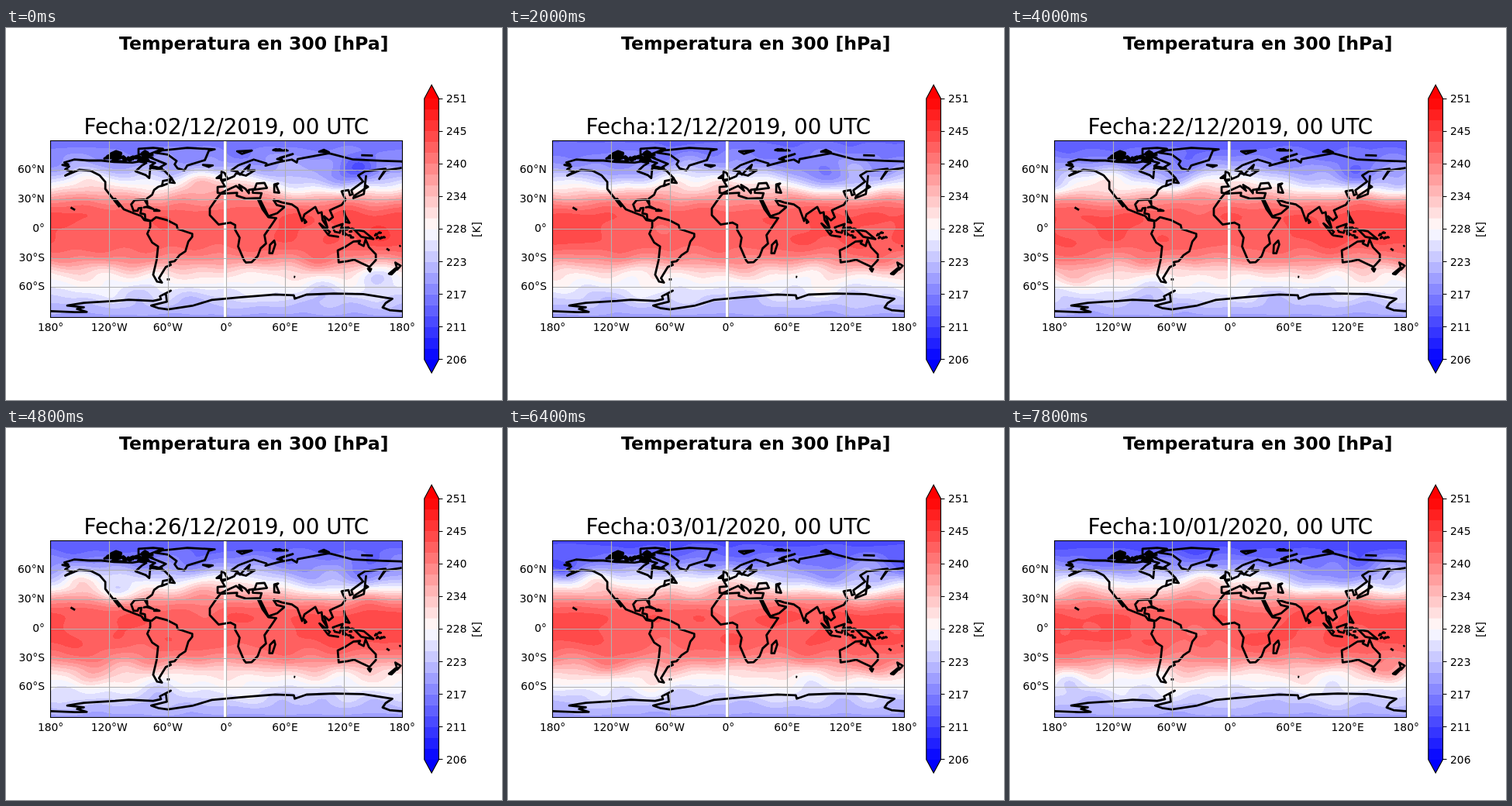
An HTML page with a canvas for the animation above (8000 ms loop, 640 by 480 pixels).

```html
<!DOCTYPE html>
<html lang="es">
<head>
<meta charset="utf-8">
<title>Temperatura en 300 hPa</title>
<style>
  html, body { margin: 0; width: 100%; height: 100%; overflow: hidden; background: #fff; }
  canvas { position: absolute; left: 57px; top: 145px; }
  svg { position: absolute; left: 0; top: 0; font: 13.89px "DejaVu Sans", sans-serif; }
</style>
</head>
<body>
<canvas id="field" width="455" height="228"></canvas>
<svg id="plot" width="640" height="480" viewBox="0 0 640 480">
  <clipPath id="frame"><rect x="57" y="145" width="455" height="229"/></clipPath>
  <text x="319.7" y="28" font-size="23.61" font-weight="bold" text-anchor="middle">Temperatura en 300 [hPa]</text>
  <text id="date" x="284.4" y="137" font-size="27.78" text-anchor="middle"></text>
  <g clip-path="url(#frame)">
    <path id="coast" transform="translate(284.4 259.2) scale(1.26 -1.26)" fill="none" stroke="#000" stroke-width="2.2" stroke-linejoin="round"/>
  </g>
  <path id="grid" stroke="#b0b0b0" stroke-width="1.1"/>
  <rect x="57.5" y="145.5" width="454" height="228" fill="none" stroke="#000" stroke-width="1.1"/>
  <g id="labels"></g>
  <g id="bar"></g>
  <text transform="translate(612 260) rotate(-90)" text-anchor="middle">[K]</text>
</svg>
<script>
const SCALE = 1.26, CX = 284.4, CY = 259.2;
const LOW = 205.8, STEP = 1.877, BANDS = 24;
const DAYS = 40, HOLD = 200, RAD = Math.PI / 180;
const $ = id => document.getElementById(id);

let seed = 11;
const rand = () => (seed = seed * 16807 % 2147483647) / 2147483647;
const between = (a, b) => a + (b - a) * rand();

// Main coast points in degrees of longitude and latitude.
const coast = {
  americaWest: 'M-141,70 -156,71 -166,68 -162,66 -168,65.5 -161,64 -165,61 -158,58.5 -165,54.5 -151,60.5 -139,59.5 -130,55 -124,48 -124,41 -117,32 -110,23 -114,31 -105,20 -95,16 -87,13 -84,9 -78,8',
  americaEast: 'M-77,8 -83,10 -83.5,15 -88,16 -87,21.5 -90,21 -91,18.5 -95,18.5 -97.5,25 -94,29.5 -84,30 -81,25 -81.5,31 -76,35 -74,40 -70,43 -61,46 -66,44 -65,49 -60,50 -56,52 -64,60 -73,62 -78,62.5 -79,52 -82.5,55 -93,59 -87,64.5 -82,67.5 -90,69 -96,68 -115,68.5 -128,70 -141,70',
  northIslands: 'M-62,66.5 -68,63 -66,62 -78,64.5 -73,67.5 -90,72 -80,73.7Z M-90,76.5 -80,76.2 -65,82 -75,83 -90,82Z M-117,70 -103,69 -106,73Z M-125,72 -116,73 -122,74Z M-59,47.7 -53,47 -56,51.5Z',
  greenland: 'M-73,78 -60,76 -51,69.5 -53,66 -50,62 -43,60 -40,65 -22,70.5 -18,80 -12,81.5 -40,83 -65,80.5Z M-24,65.5 -18,63.4 -14,65Z',
  southAmerica: 'M-78,8 -78,2 -81,-5 -76,-14 -70,-18 -71.5,-32 -75,-47 -71,-54 -66,-55 -69,-50.5 -62,-39 -57,-37 -58,-34 -53,-33 -48,-27 -42,-23 -39,-13 -35,-8 -35,-5 -50,0 -51,4 -61,9 -72,12 -77,8',
  caribbean: 'M-84.5,22 -80,23 -74.5,20.2 -82,22.5Z M-74,18.5 -72,19.8 -68.5,18.5Z',
  africa: 'M-6,36 -10,31 -17,21 -17,14 -8,4.5 4,6.5 9,4 9,-1 13.5,-9 12,-18 18,-32 20,-34.5 26,-34 32,-28 35,-20 40.5,-15 39,-6.5 51,11 43,12 37,20 32.5,29.8 35,29 43,13 52,16 59.5,22.5 51.5,24.5 48,30',
  madagascar: 'M44,-25 44.5,-16.5 49,-12 50,-16 47,-25Z',
  asiaSouth: 'M48,30 57,27 67,25 72.7,21 77.5,8 80,15 91,22.5 94,16 97.5,17 98.5,9 103.5,1.3 100,13 105,8.7 109,12 106,19 110,21 118,24.5 122,30 119.5,35 118,38.5 125,39.7 126.5,34.5 129.3,35.5 128,39.5 140,48.5 135,54.7 142,59 163,61.5 156.5,51.2 163,60 179.5,62.5',
  asiaNorth: 'M180,69 160,69.7 130,71 105,77.5 73,71.5 72,68 67,71 54,68.5 40,64.7 41,67 28,71 12,65 5,60 11,59 14,55.5 18,60 24,65.7 22,60 29,60 20,54.5 10,57 8,54 -4.5,48.5 -1.5,43.5 -9,43 -9,37 -6,36.5',
  mediterranean: 'M-6,36.5 0,39.5 10,44 16,39 13,45 19.5,41 23,36.5 23,40 29,41 31,46.5 39,47 41.5,42 27,40 27,37 36,36.5 34.5,31.5 20,31 10.5,34 11,37 -6,36',
  caspian: 'M49,45.5 49,37.5 54,37 51,44.5 53,46.5Z',
  britain: 'M-5.5,50 1.3,51 -2,57.5 -5,58.5Z M-10,52 -6,52.2 -6,55Z',
  arcticRussia: 'M11,79.5 16,76.8 26,80.2Z M52,71.5 57,70.7 55,73 68,76.7Z M95,79 105,78.5 100,81Z M138,75.5 150,75',
  indonesia: 'M95.3,5.6 104,-5.8 106,-3Z M105.3,-6.7 114.5,-8Z M109,1.5 111,-3 116,-4 119,5Z M119.5,-5.5 120,1 125,1.5 121,-1Z M131,-.8 141,-2.6 150.5,-10.5 138,-8Z',
  eastIslands: 'M80,9.5 81.8,7 80.3,6Z M120.5,18.3 121.5,14 126,6.2 122,7Z M130,31.5 131,34 140,40 145,43 142,45 140.7,35.7Z M142,46 143,54Z',
  australia: 'M114,-22 115,-34.2 124,-33 131,-31.5 138,-35 146.5,-39 153,-32 153,-26 146,-18.8 142.5,-10.8 140.5,-17.5 135.5,-15 136.8,-12.2 130,-13 122.3,-18Z M145,-40.8 148.2,-41 147,-43.6Z',
  newZealand: 'M173,-34.5 178.4,-37.7 175,-41.6Z M173,-40.5 174,-41.7 169,-46.6 166.5,-46Z',
  smallIslands: 'M-159.5,22 -155,19.3 M69,-49 70.5,-49.3 M-61,-51.7 -58,-51.7 M164,-20.2 167,-22.2 M177,-18 178.6,-17',
  antarctica: 'M-180,-84.3 -155,-85.2 -143,-85 -153,-82 -146,-80.3 -163,-78.5 -146,-75.8 -114,-73.8 -100,-72.5 -75,-73.8 -67,-72 -68,-69 -57,-63.3 -62,-66 -61,-74.5 -77,-78.5 -70,-81 -60,-82.5 -35,-78.8 -15,-72.8 15,-70 50,-67.2 69,-68 70,-71.5 82,-67.3 110,-66.3 140,-66.8 170,-71.5 163,-76 160,-80.5 167,-83.2 180,-84.3'
};

// A loose scatter of small islands inside a box of degrees.
function islands(count, west, east, south, north, size) {
  return Array.from({ length: count }, () => {
    const x = between(west, east), y = between(south, north), w = size * between(0.5, 1.5);
    return `M${x},${y}l${w},${between(-1, 1)} ${-w / 2},${size / 4}Z`;
  }).join('');
}

// Mean temperature every 15 degrees, from south to north.
const zonal = [220.5, 223.5, 227, 231.5, 239, 242.8, 243, 243, 237.5, 228, 220.5, 216.5, 214];

// Passing warm and cold systems: day, lon, lat, kelvin.
const systems = [
  [0, -145, 52, 6], [0, -25, 50, 4], [0, 140, 62, -4], [0, 155, -48, -5],
  [6, -105, 48, -5], [6, 165, 48, 4], [6, -110, -42, -5], [6, 0, -42, 4],
  [14, -105, 50, -6], [14, -35, 52, 5], [14, -50, -40, -4], [14, 100, -52, -4],
  [20, 180, 42, -5], [20, -125, 52, 5], [20, -50, 48, -6], [20, -165, -52, 4],
  [24, -150, 50, 5], [24, -115, 38, -7], [24, -140, -48, 4],
  [32, -135, 50, 5], [32, -170, 62, -4], [32, -130, -42, 6], [32, 150, -40, 5],
  [39, -150, 48, 4], [39, -25, 48, 3], [39, -165, -52, -4], [39, 160, -45, 5]
];

const waves = Array.from({ length: 10 }, (_, i) => ({
  k: 2 + i % 7,
  l: (i % 2 ? 1 : -1) * between(0.06, 0.19),
  phase: between(0, 2 * Math.PI),
  speed: between(0.15, 0.45)
}));
const noise = (lon, lat, day) => waves.reduce((sum, w) =>
  sum + Math.sin(w.k * lon * RAD + w.l * lat + w.phase - w.speed * day), 0) * 0.3;

const bell = x => Math.exp(-x * x);
const clamp = (v, lo, hi) => Math.min(hi, Math.max(lo, v));

// Smooth curve through evenly spaced values.
function curve(vals, u) {
  const i = Math.floor(u), f = u - i;
  const [a, b, c, d] = [-1, 0, 1, 2].map(k => vals[clamp(i + k, 0, vals.length - 1)]);
  return b + f / 2 * (c - a + f * (2 * a - 5 * b + 4 * c - d + f * (3 * (b - c) + d - a)));
}

const COLS = 145, ROWS = 73, GRID = 2.5;
const temp = new Float32Array(COLS * ROWS);

function solve(day) {
  const active = systems.map(([d, lon, lat, k]) => ({
    lon: lon + 4 * (day - d), lat, k: k * bell((day - d) / 3.5)
  })).filter(p => Math.abs(p.k) > 0.05);
  for (let r = 0; r < ROWS; r++) {
    const lat = 90 - r * GRID, far = Math.abs(lat);
    const mean = curve(zonal, (lat + 90) / 15) + (2 - day / 10) * clamp((lat - 55) / 25, 0, 1);
    const gain = Math.min(0.8 + 0.7 * clamp((far - 20) / 20, 0, 1), (90 - far) / 12);
    const north = bell((lat - 48) / 14), tropics = bell(lat / 25);
    for (let c = 0; c < COLS; c++) {
      const lon = c * GRID - 180, a = lon * RAD;
      // Cold Asia, mild Atlantic, warm western Pacific.
      let t = mean + north * (3.5 * Math.cos(a + 0.7) + 2 * Math.cos(2 * a + 5.76));
      t += tropics * 0.9 * Math.cos(a - 2.6) + gain * noise(lon, lat, day);
      for (const p of active) {
        const dx = (lon - p.lon + 900) % 360 - 180;
        t += p.k * bell(dx / 19) * bell((lat - p.lat) / 11);
      }
      temp[r * COLS + c] = t;
    }
  }
}

const colors = Array.from({ length: BANDS }, (_, i) => {
  const t = (i + 0.5) / BANDS, up = Math.round(510 * t), down = Math.round(510 * (1 - t));
  return t < 0.5 ? [up, up, 255] : [255, down, down];
});
const ctx = $('field').getContext('2d');
const img = ctx.createImageData(455, 228);

function paint() {
  for (let y = 0, p = 0; y < img.height; y++) {
    const v = clamp((90 - (CY - 145.5 - y) / SCALE) / GRID, 0, ROWS - 1.001);
    const r = Math.floor(v), fy = v - r;
    for (let x = 0; x < img.width; x++, p += 4) {
      const lon = (x + 57.5 - CX) / SCALE;
      const u = clamp((lon + 180) / GRID, 0, COLS - 1.001);
      const c = Math.floor(u), fx = u - c, o = r * COLS + c;
      const top = temp[o] + (temp[o + 1] - temp[o]) * fx;
      const low = temp[o + COLS] + (temp[o + COLS + 1] - temp[o + COLS]) * fx;
      const band = Math.floor((top + (low - top) * fy - LOW) / STEP);
      // The data stop one cell short of the prime meridian.
      const rgb = lon > -GRID && lon < 0 ? [255, 255, 255] : colors[clamp(band, 0, BANDS - 1)];
      img.data[p] = rgb[0];
      img.data[p + 1] = rgb[1];
      img.data[p + 2] = rgb[2];
      img.data[p + 3] = 255;
    }
  }
  ctx.putImageData(img, 0, 0);
}

const label = (x, y, text, anchor) => `<text x="${x}" y="${y}" text-anchor="${anchor}">${text}</text>`;

function buildMap() {
  $('coast').setAttribute('d', Object.values(coast).join(' ') +
    islands(24, -122, -84, 69, 77.5, 7) + islands(5, 46, 62, 80, 81, 4) +
    islands(8, 118, 130, -9, 2, 2) + islands(5, 150, 162, -10, -4, 2));
  let lines = '', marks = '';
  for (let lon = -180; lon <= 180; lon += 60) {
    const x = CX + lon * SCALE, side = lon % 180 ? (lon < 0 ? 'W' : 'E') : '';
    if (Math.abs(lon) < 180) lines += `M${Math.round(x) + 0.5},146V373`;
    marks += label(x, 391, Math.abs(lon) + '°' + side, 'middle');
  }
  for (let lat = -60; lat <= 60; lat += 30) {
    const y = CY - lat * SCALE, side = lat ? (lat < 0 ? 'S' : 'N') : '';
    lines += `M58,${Math.floor(y) + 0.5}H511`;
    marks += label(50, y + 3.65, Math.abs(lat) + '°' + side, 'end');
  }
  $('grid').setAttribute('d', lines);
  $('labels').innerHTML = marks;
}

function buildBar() {
  const x0 = 539.8, x1 = 558.5, top = 91, bottom = 427.8, h = (bottom - top) / BANDS;
  const mid = (x0 + x1) / 2, upper = `L${mid},73.5 ${x1},${top}`, lower = `L${mid},445 ${x0},${bottom}`;
  let out = `<path d="M${x0},${top}${upper}Z" fill="#f00"/><path d="M${x1},${bottom}${lower}Z" fill="#00f"/>`;
  colors.forEach((c, i) => {
    out += `<rect x="${x0}" y="${bottom - (i + 1) * h}" width="${x1 - x0}" height="${h + 0.3}" fill="rgb(${c})"/>`;
  });
  out += `<path d="M${x0},${top}${upper}V${bottom}${lower}Z" fill="none" stroke="#000" stroke-width="1.1"/>`;
  for (let i = 0; i <= BANDS; i += 3) {
    const y = bottom - i * h;
    out += `<path d="M${x1},${Math.floor(y) + 0.5}h5" stroke="#000" stroke-width="1.1"/>` +
      label(568, y + 5, Math.round(LOW + i * STEP), 'start');
  }
  $('bar').innerHTML = out;
}

let shown = -1;
function draw() {
  const day = Math.floor(performance.now() / HOLD) % DAYS;
  if (day !== shown) {
    shown = day;
    const [y, m, d] = new Date(Date.UTC(2019, 11, 2 + day)).toISOString().slice(0, 10).split('-');
    $('date').textContent = `Fecha:${d}/${m}/${y}, 00 UTC`;
    solve(day);
    paint();
  }
  requestAnimationFrame(draw);
}

buildMap();
buildBar();
draw();
</script>
</body>
</html>
```
